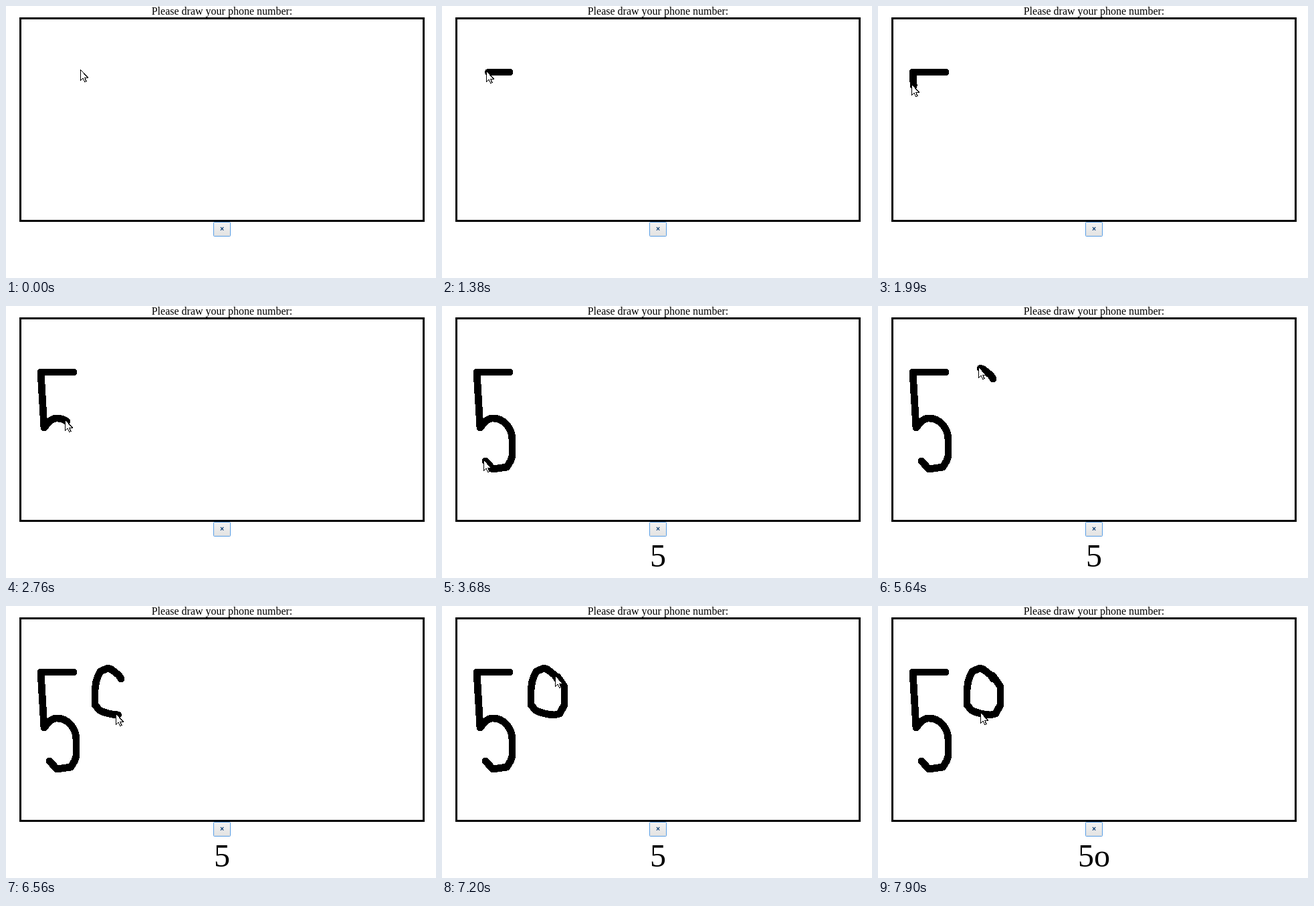
Recreate the animation shown at these times as an HTML page. Size 643 px wide and 407 px high, loop 8 s.

```html
<!DOCTYPE html>
<html lang="en">
<head>
<meta charset="utf-8">
<title>Draw your phone number</title>
<style>
  html, body { margin: 0; width: 100%; height: 100%; overflow: hidden; background: #fff; }
  svg { display: block; width: 643px; height: 407px; }
  text { font-family: "Liberation Serif", "Times New Roman", serif; text-anchor: middle; }
  .times { font: bold 10.5px "Liberation Sans", Arial, sans-serif; fill: #0b3f78; }
  #ink { fill: none; stroke: #000; stroke-width: 10.8; stroke-linecap: round; stroke-linejoin: round; }
  #ink, #cursor { shape-rendering: crispEdges; }
</style>
</head>
<body>
<svg viewBox="0 0 643 407">
  <defs>
    <linearGradient id="face" x2="0" y2="1">
      <stop offset="0" stop-color="#f2f2f2"/>
      <stop offset="1" stop-color="#e2e2e2"/>
    </linearGradient>
  </defs>
  <text x="323" y="13" font-size="16">Please draw your phone number:</text>
  <rect x="21.5" y="18.5" width="603" height="303" fill="none" stroke="#000" stroke-width="3"/>
  <rect x="310.5" y="323.5" width="25" height="21" rx="1" fill="url(#face)" stroke="#569de5"/>
  <text class="times" x="323" y="337">×</text>
  <text id="result" x="323" y="390" font-size="48"></text>
  <g id="ink"></g>
  <path id="cursor" d="M.5.5V16.5L4.2 13.1 6.7 18.5 9 17.5 6.5 12.1H11.4Z" fill="#fff" stroke="#000"/>
</svg>
<script>
const LOOP = 8000, BEAT = 460, STEP = 76;
const easeOut = p => 1 - (1 - p) ** 2;
const easeIn = p => p ** 1.6;
const linear = p => p;

const $ = id => document.getElementById(id);

// One stretch of the pen's route, drawn with ink or only hovered.
function stretch(from, to, d, ease, inked) {
  const path = document.createElementNS("http://www.w3.org/2000/svg", "path");
  path.setAttribute("d", d);
  $("ink").append(path);
  return { from, to, ease, inked, path, length: path.getTotalLength() };
}
const move = (from, to, d, ease = linear) => stretch(from, to, d, ease, false);
const line = (from, to, d, ease = linear) => stretch(from, to, d, ease, true);

const route = [
  move(200, 920, "M114 97L101 99"),
  // Five
  line(1070, 1840, "M101 99H52", easeOut),
  line(1840, 2150, "M52 99L57 182"),
  line(2380, 3070, "M57 182L62 176Q68 168 76 168C92 168 105 182 105 200V224L103 231", easeIn),
  line(3070, 3530, "M103 231L97 241 76 244 65 232"),
  move(3920, 4470, "M65 232L161 141Q166 130 168 109", easeOut),
  move(4470, 5060, "M168 109L170 112 172 109"),
  // Zero
  line(5100, 5410, "M172 109L169 104"),
  line(5410, 5870, "M169 104L158 95 152 93 141 98 138 104"),
  line(5870, 6330, "M138 104L135 112 133 125V148L140 156"),
  line(6330, 6560, "M140 156Q151 162 168 163"),
  line(6560, 6790, "M168 163L176 161 183 148V130"),
  line(6790, 7200, "M183 130V121L176 110 171 104"),
  move(7400, 7860, "M171 104L156 161")
];

function snap(t) {
  const shift = t < 4000 ? 0 : 40;
  const into = (t - shift) % BEAT;
  return t - into + Math.min(Math.floor(into / STEP), 4) * STEP;
}

function draw(t) {
  const time = snap(t);
  let pen = route[0].path.getPointAtLength(0);
  for (const { from, to, ease, inked, path, length } of route) {
    const started = time >= from;
    const done = started ? length * ease(Math.min(1, (time - from) / (to - from))) : 0;
    if (started) pen = path.getPointAtLength(done);
    path.style.visibility = started && inked ? "visible" : "hidden";
    path.style.strokeDasharray = `${done} ${length + 20}`;
  }
  $("cursor").setAttribute("transform", `translate(${Math.round(pen.x - 3)} ${Math.round(pen.y - 2)})`);
  $("result").textContent = t < 3680 ? "" : t < 7430 ? "5" : "5o";
}

const start = performance.now();
function tick() {
  draw((performance.now() - start) % LOOP);
  requestAnimationFrame(tick);
}
tick();
</script>
</body>
</html>
```
